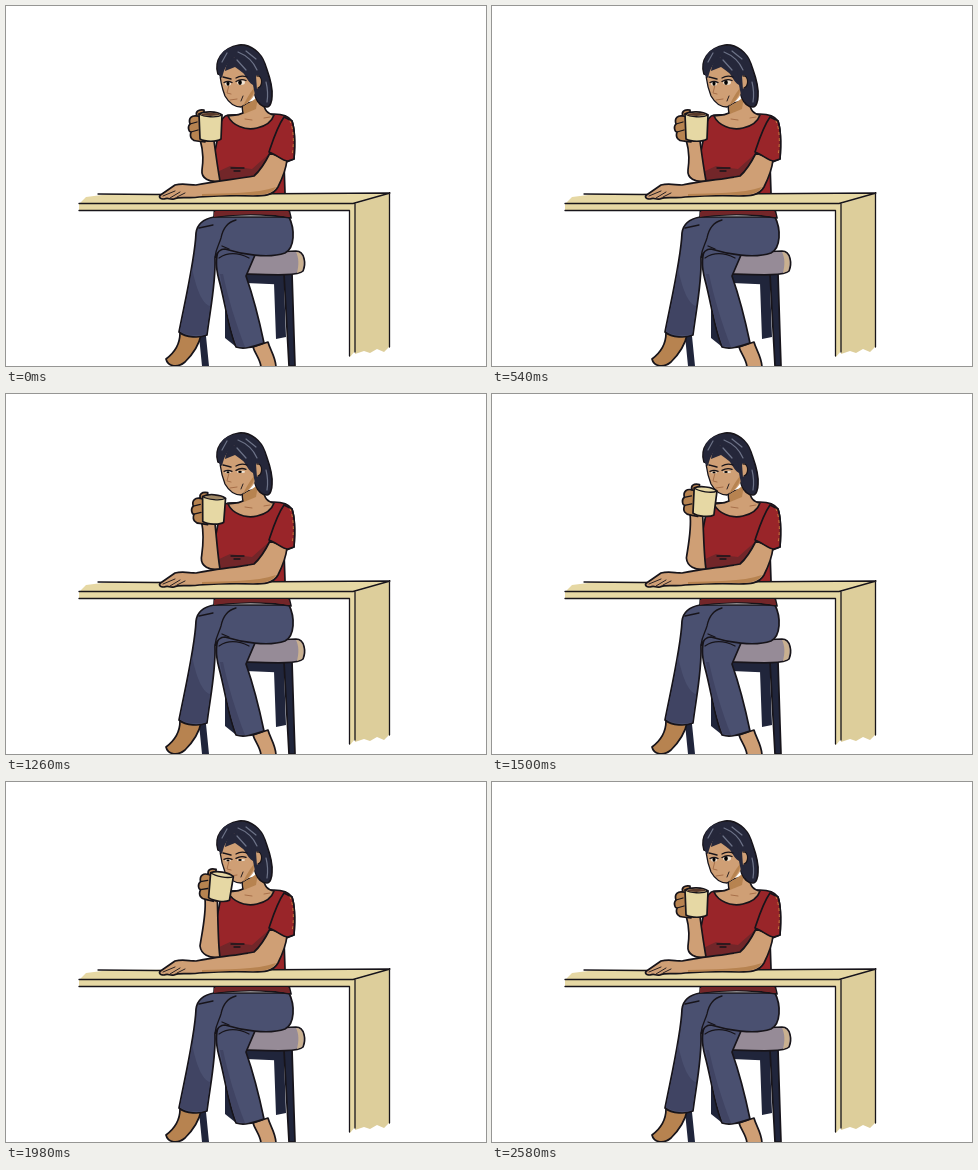
An HTML page that plays this animation: 480 by 360 pixels, repeating every 2.61 s.

```html
<!DOCTYPE html>
<html lang="en">
<head>
<meta charset="utf-8">
<title>Coffee break</title>
<style>
  html, body { margin: 0; width: 100%; height: 100%; overflow: hidden; background: #fff; }
  svg { display: block; width: 480px; height: 360px; }
  path, ellipse { stroke-linejoin: round; stroke-linecap: round; }
  .ink { stroke: #17141a; stroke-width: 1.7; }
  .line { fill: none; stroke: #17141a; stroke-width: 1.3; }
  .fine { fill: none; stroke: #17141a; stroke-width: .9; }
  .crease { fill: none; stroke: #a8704a; stroke-width: 1; }
  .skin { fill: #cf9f75; }
  .tan { fill: #b78350; }
  .red { fill: #992529; }
  .wine { fill: #722629; }
  .denim { fill: #4a5070; }
  .navy { fill: #404463; }
  .dark { fill: #20253b; }
  .hair { fill: #25273a; }
  .shine { fill: none; stroke: #6d7388; stroke-width: 1.2; }
  .cream { fill: #e6d8a4; }
  .wood { fill: #ddce9b; }
</style>
</head>
<body>
<svg viewBox="0 0 480 360">
  <g id="stool">
    <path class="dark" d="M219 280L231 330L229 340L219 332ZM193 330H200L203 360H196ZM240 266L286 267V279L240 277ZM268 277H278L280 331L270 333Z"/>
    <path class="dark ink" d="M278 268L286 267L288 330L289 360H283Z"/>
    <path class="ink" fill="#968b97" d="M237 268L246 247L290 245C299 245 300 258 297 265C292 270 270 269 237 268Z"/>
    <path fill="#c9b090" d="M290 246C298 246 299 258 296 265L291 267C293 259 293 252 290 246Z"/>
  </g>

  <g id="legs">
    <path class="skin ink" d="M247 341L262 336C264 344 270 351 270 362H255C255 354 249 348 247 341Z"/>
    <path class="denim ink" d="M214 240C209 250 210 263 213 274C219 296 222 321 230 341C239 344 249 340 258 337C253 313 247 290 240 270L249 249L240 238Z"/>
    <path class="navy" d="M214 268C218 290 223 320 231 340L239 341C230 318 222 292 217 268Z"/>
    <path class="tan ink" d="M174 327L195 329C193 339 187 348 179 356C172 362 162 361 160 353C168 347 174 338 174 327Z"/>
    <path class="denim ink" d="M208 211C197 213 191 219 190 227C189 253 179 295 173 326C180 332 194 332 201 329C204 304 210 277 209 252C211 246 214 243 219 243C235 248 262 253 279 247C289 242 289 223 283 211Z"/>
    <path class="navy" d="M186 262C183 286 178 306 174 325C180 330 193 330 200 328L204 300C196 298 190 282 186 262Z"/>
    <path class="line" d="M209 251C210 242 213 239 215 232C217 222 222 216 230 214M216 240L223 243M213 252C222 246 231 246 243 252M193 222L207 219"/>
  </g>

  <g id="shirt">
    <path class="red ink" d="M222 109C217 110 215 114 214 120L209 145L210 178L208 211C232 208 262 208 285 212L279 187L278 157L288 153C289 139 289 124 286 115C282 109 275 108 268 108Z"/>
    <path class="wine" d="M264 147L256 165L238 174L213 176L211 166L224 160L246 163ZM208 206H283L284 211C262 207 230 208 208 211Z"/>
    <path class="line" d="M225 162H238M228 165H234"/>
    <path class="skin ink" d="M236 98L237 107C231 110 227 109 222 110C226 119 239 125 251 122C260 120 266 115 268 109C262 108 258 105 257 94Z"/>
    <path class="tan" d="M237 101L252 91L250 103L238 108Z"/>
    <path class="crease" d="M239 113L246 114M258 112L264 111"/>
  </g>

  <g id="table">
    <path class="cream" d="M73 204V198L80 191L104 188L384 187L349 198V345L344 351L343 204Z"/>
    <path class="wood" d="M349 198L384 187V340L378 346L371 343L364 347L358 345L349 348Z"/>
    <path class="line" d="M92 188L150 188.5L384 187L347 197.5H73M73 204.5H343.5V350M349 198V346M383.5 187V341"/>
  </g>

  <path id="forearm" class="skin ink"/>

  <g id="resting-arm">
    <path class="skin ink" d="M264 147L281 154C280 163 276 173 272 181C267 190 257 190 247 190C226 189 208 190 193 191C184 193 174 190 168 193C163 194 163 191 158 193C153 193 152 190 156 188L169 179C177 177 183 179 190 179C210 175 232 173 248 170C256 163 260 155 264 147Z"/>
    <path class="tan" d="M196 188C220 187 250 188 270 181C265 189 255 189 245 189C226 188 210 190 196 190Z"/>
    <path class="fine" d="M157 190L169 185M164 192L174 186M171 191L179 187"/>
    <path class="red ink" d="M263 146C270 148 276 155 282 155L288 153C289 139 289 124 286 115L278 111C271 121 267 134 263 146Z"/>
    <path fill="none" stroke="#c87f3e" stroke-dasharray="2 4" d="M284 115C288 124 288 139 286 149"/>
  </g>

  <g id="head">
    <path class="hair ink" d="M212 68C208 55 216 42 233 39C245 38 255 47 259 58C262 67 267 78 266 90C266 96 264 101 261 101C255 101 252 97 250 92L246 80Z"/>
    <path class="skin" d="M214 63C214 72 216 82 219 90C223 97 229 101 235 101C243 97 249 91 250 83C257 82 257 70 251 69L245 55L229 50Z"/>
    <path class="line" d="M214 66C214 74 216 82 219 90C223 97 229 101 235 101L240 98M251 70C257 69 257 80 252 82"/>
    <path class="tan" d="M248 82C249 88 243 96 237 100C240 94 243 88 248 82Z"/>
    <path class="hair" d="M228 51C222 56 218 62 216 72C209 67 211 51 218 45C232 35 253 41 258 57L263 74L257 82C257 71 253 67 250 70L251 84L253 97L249 89L247 79C241 76 237 64 228 51Z"/>
    <path class="hair" d="M227 51C222 55 220 59 219 65L229 61C235 65 241 70 247 76L244 54Z"/>
    <path class="shine" d="M221 47L216 56M232 46C242 50 248 57 251 64M240 45L250 53M260 76C262 84 262 90 261 96M231 54L240 64"/>
    <path class="line" d="M217 71L225 73M230 72Q235 69 241 71"/>
    <path class="crease" d="M223 79L221 87L225 88M224 94L231 93"/>
    <path class="fine" d="M237 90L235 95"/>
    <g id="eyes">
      <ellipse cx="222" cy="77.5" rx="3" ry="2.2" fill="#f0e3d2"/>
      <ellipse cx="235" cy="76.5" rx="4" ry="2.4" fill="#f0e3d2"/>
      <ellipse cx="222" cy="77.5" rx="1.5" ry="2.2"/>
      <ellipse cx="234" cy="76.5" rx="1.8" ry="2.4"/>
    </g>
    <path id="lids" class="line"/>
  </g>

  <g id="mug">
    <path class="tan ink" d="M198 104C192 103 189 106 191 110C186 109 182 112 184 118C181 121 183 126 185 126C183 132 187 135 191 135L199 136Z"/>
    <path class="line" d="M184 118L191 116M185 126L192 124M191 110L194 111"/>
    <path class="cream ink" d="M193 108L194 133C199 136 211 136 215 133L216 109C211 105 198 105 193 108Z"/>
    <path class="line" d="M193 108C198 111 211 112 216 109"/>
    <ellipse id="coffee" cx="204.5" cy="108.4" rx="9" ry="1.7" fill="#5a3a2b"/>
  </g>
</svg>
<script>
const LOOP = 2610, STEP = 60;
const part = id => document.getElementById(id);

// [time, right, up, tilt]
const sip = [[0, 0, 0, 0], [1080, 0, 0, 0], [1500, 8, 13, 5], [1680, 10, 16, 7],
             [1980, 10, 16, 7], [2220, 4, 4, 5], [2400, 0, 0, 0], [LOOP, 0, 0, 0]];
// [time, closed]
const blink = [[0, 0], [900, 0], [1020, .5], [1500, .6], [1980, .6], [2220, .05], [2400, 0], [LOOP, 0]];

function sample(keys, t) {
  const i = keys.findIndex(key => key[0] > t);
  const a = keys[i - 1], b = keys[i];
  const p = (t - a[0]) / (b[0] - a[0]);
  const eased = p * p * (3 - 2 * p);
  return a.slice(1).map((v, k) => v + (b[k + 1] - v) * eased);
}

function draw(now) {
  const t = Math.floor(now % LOOP / STEP) * STEP;
  const [x, up, tilt] = sample(sip, t);
  const [closed] = sample(blink, t);

  part("mug").setAttribute("transform", `translate(${x} ${-up}) rotate(${tilt} 204 121)`);
  part("coffee").setAttribute("opacity", Math.max(0, 1 - up / 10));
  part("forearm").setAttribute("d",
    `M${194 + x / 2} ${133 - up}C${198 + x / 4} ${148 - up} ${197 - x / 5} 156 ${196 - x / 5} 164` +
    `C195 172 203 177 214 175C212 164 ${210 + x / 5} ${150 - up} ${208 + x / 3} ${135 - up}Z`);

  part("eyes").setAttribute("transform", `translate(0 ${79 * closed}) scale(1 ${1 - closed})`);
  const y = 75.5 + 1.5 * closed;
  part("lids").setAttribute("d", `M218 ${y + 1}Q222 ${y - 1} 226 ${y + 1}M230 ${y}Q235 ${y - 3} 240 ${y - 1}`);
  requestAnimationFrame(draw);
}
draw(0);
</script>
</body>
</html>
```
